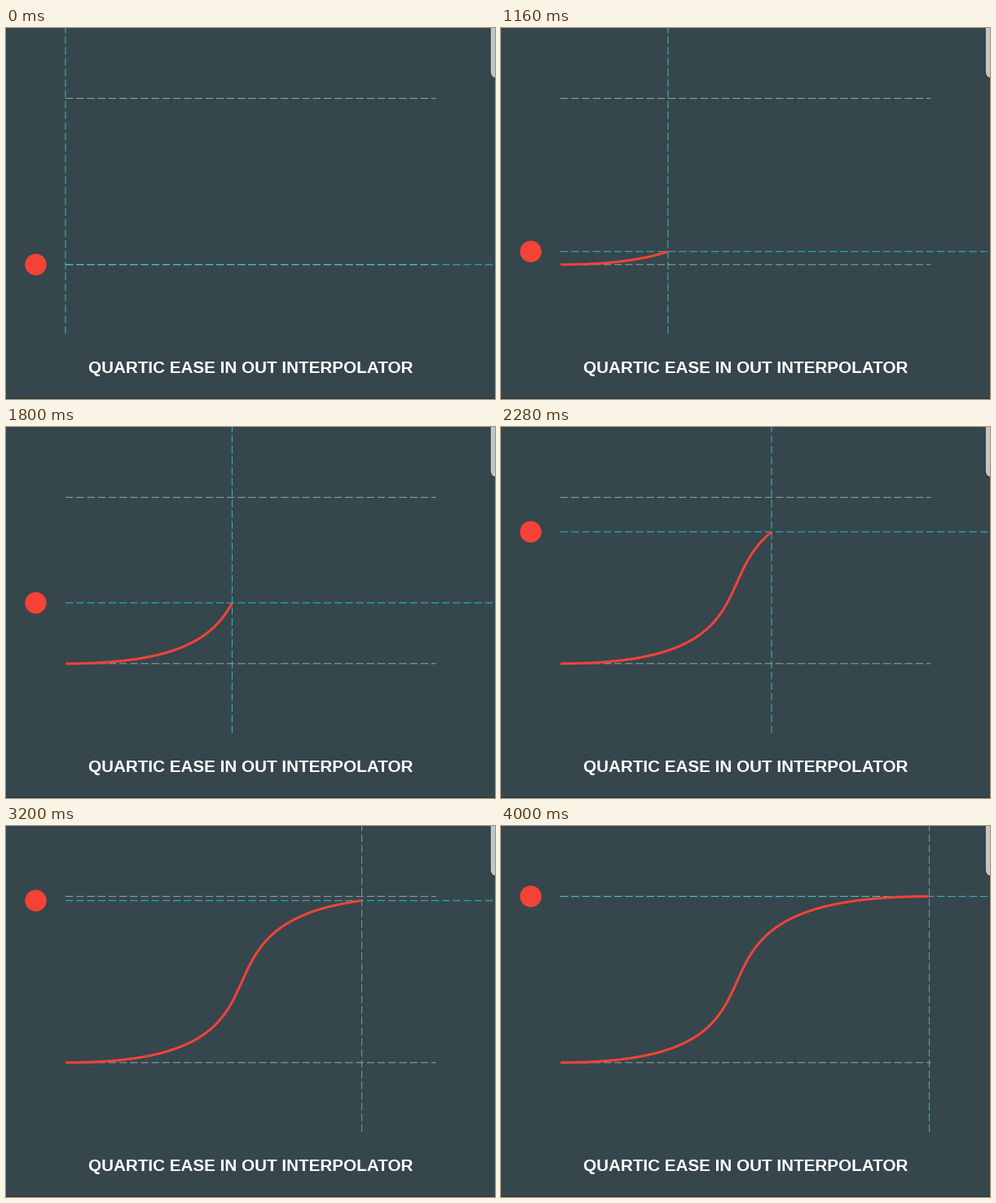
Animation of 600x456 px, one loop 4040 ms. Source, as a matplotlib script:

```python
import numpy as np
import matplotlib.pyplot as plt
from matplotlib.animation import FuncAnimation
from matplotlib.patches import Circle, FancyBboxPatch, Rectangle

W, H, DPI = 600, 456, 96
PX = 72 / DPI  # one pixel in points
FRAMES, STEP = 101, 40

BG, RED, CYAN, GREY = "#36464d", "#f44336", "#2ccfd6", "#959c9f"
LEFT, RIGHT, TOP, BOTTOM = 73, 527, 86.5, 290.8
SPEED, STOP = 0.1136, 525.5  # cursor pixels per ms, and where it halts

# Quartic ease-in-out as cubic-bezier(0.77, 0, 0.175, 1)
s = np.linspace(0, 1, 81)
ease_x = 3 * 0.77 * s * (1 - s)**2 + 3 * 0.175 * s**2 * (1 - s) + s**3
ease_y = s**2 * (3 - 2 * s)
CURVE_X = LEFT + (RIGHT - LEFT) * ease_x
CURVE_Y = BOTTOM + (TOP - BOTTOM) * ease_y

fig = plt.figure(figsize=(W / DPI, H / DPI), dpi=DPI, facecolor=BG)
ax = fig.add_axes([0, 0, 1, 1])
ax.set(xlim=(0, W), ylim=(H, 0))
ax.axis("off")


def dashed(x, y, color, z, alpha=1, width=1.1, on=9.4, off=3.8):
    style = (0, (on / width, off / width))
    return ax.plot(x, y, color=color, lw=width * PX, ls=style,
                   alpha=alpha, zorder=z, snap=False)[0]


def panel(x, bottom, color, alpha, z):
    box = FancyBboxPatch((x, -30), 60, bottom + 30, fc=color, ec="none",
                         boxstyle="round,pad=0,rounding_size=8",
                         alpha=alpha, zorder=z)
    ax.add_patch(box)


panel(593.5, 63, "#1f2a30", 0.35, 5)
panel(594.8, 61.5, "#c3c6c8", 1, 6)
ax.add_patch(Rectangle((0, 454.5), W, 2, color="#29343a", lw=0))

for level in (TOP, BOTTOM):
    dashed([LEFT, RIGHT + 0.5], [level, level], GREY, 1)

h_line = dashed([LEFT, W], [BOTTOM, BOTTOM], CYAN, 2, alpha=0.8)
v_line = dashed([LEFT, LEFT], [376, 0], CYAN, 2, alpha=0.8)
curve, = ax.plot([], [], color=RED, lw=3 * PX, zorder=3,
                 solid_capstyle="butt", solid_joinstyle="round")
dot = ax.add_patch(Circle((36.5, BOTTOM), 13.2, fc=RED, ec="none", zorder=4))

ax.text(W / 2 + 0.5, 424.5, "QUARTIC EASE IN OUT INTERPOLATOR",
        color="white", family="Liberation Sans", weight="bold",
        size=20.6 * PX, ha="center", va="baseline")


def update(frame):
    x = min(LEFT + SPEED * STEP * frame, STOP)
    y = np.interp(x, CURVE_X, CURVE_Y)
    v_line.set_xdata([x, x])
    h_line.set_ydata([y, y])
    dot.center = (36.5, y)
    past = CURVE_X < x
    curve.set_data(np.append(CURVE_X[past], x), np.append(CURVE_Y[past], y))
    return h_line, v_line, curve, dot


anim = FuncAnimation(fig, update, frames=FRAMES, interval=STEP,
                     repeat=True, repeat_delay=0, blit=False)
plt.show()
```
